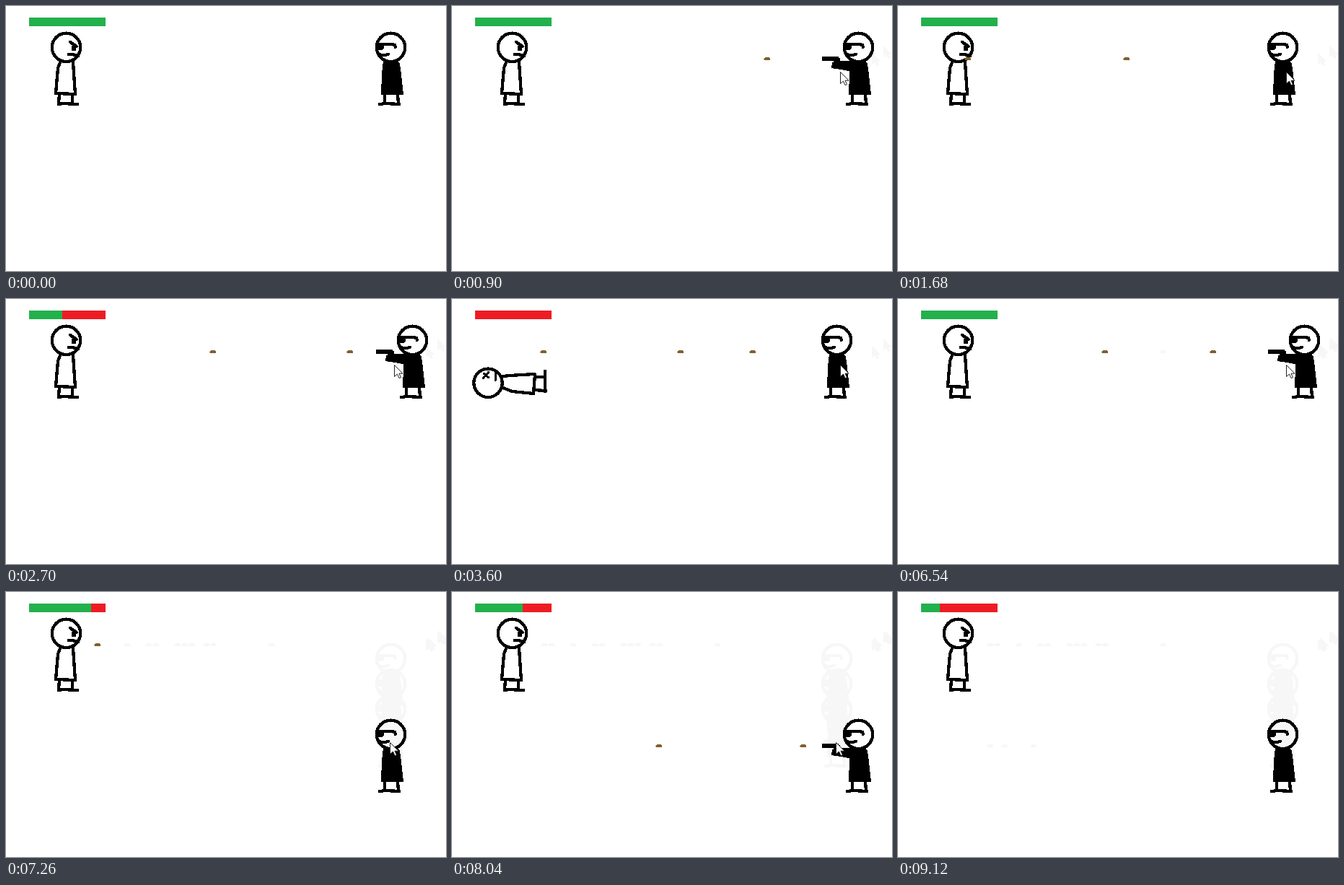
Animation of 610x367 px, one loop 9.36 s. Source, as an HTML page:

```html
<!DOCTYPE html>
<html lang="en">
<head>
<meta charset="utf-8">
<title>Duel</title>
<style>
  html, body { margin: 0; width: 100%; height: 100%; overflow: hidden; background: #fff; }
  svg { display: block; width: 610px; height: 367px; shape-rendering: crispEdges; }
  .ink { fill: none; stroke: #000; stroke-width: 4.3; stroke-linecap: round; stroke-linejoin: round; }
  .solid { fill: #000; }
  #trails .ink { stroke: #f7f7f7; }
  #trails .solid { fill: #f7f7f7; }
</style>
</head>
<body>
<svg viewBox="0 0 610 367">
  <g id="trails"></g>

  <rect x="32" y="16" width="106" height="12" fill="#ed1c24"/>
  <rect id="health" x="32" y="16" width="106" height="12" fill="#22b14c"/>

  <g id="alive">
    <g class="ink">
      <circle cx="83.5" cy="57.3" r="19.7"/>
      <path d="M89 50l9 6M87 67l5 0 8 2"/>
      <path d="M75 78l-3 8-3 35 27 1-3-44M74 122l-1 13M92 122v13M73 136l6-1 20 1"/>
    </g>
    <path class="solid" d="M91 55h6v7h-6z"/>
  </g>

  <g id="dead" class="ink">
    <circle cx="50" cy="116.3" r="19.7"/>
    <path stroke-width="3" d="M43 110l8-9M44 103l7 6M60 102l1 3-1 8"/>
    <path d="M71 107l9-1 34-2 1 1-2 26-30-3-12-5M115 108h14M113 126l17 1M129 100v28"/>
  </g>

  <g id="bullets"></g>

  <g id="shooter"></g>
  <path id="gun" class="solid" d="M513 70h23v2h2v4h14l4 2v13l-17-3-13-2 1-8h2v-2h-16z"/>
  <path id="cursor" d="M.5.5v16l4-3.5 2.6 5.7 2.4-1-2.5-5.5h5z" fill="#fff" stroke="#222" shape-rendering="auto"/>
</svg>

<script>
const LOOP = 9360, STEP = 60, TICK = 23;
const DEATH = 3600, REVIVE = 5400, GUN_TIME = 200;
const $ = id => document.getElementById(id);

const SHOOTER = `<g class="ink">
  <circle cx="533.5" cy="57.3" r="19.7"/>
  <path d="M515 53h20l4 1 1 3M516 66l4 2h5l5-1"/>
  <path d="M525 122v13M543 122l1 13M518 136l8-1 19 1"/></g>
  <path class="solid" d="M514 53h10v6l-3 2h-7zM523 76h20l3 4 2 15 3 28h-31l1-30z"/>`;
const BULLET = '<path d="M0 74v-1l3-2h5l1 2v2h-8z" class="solid"/>';
const ARROW = '<path d="M0 0v17l4-3 3 5 3-1-2-5h4z" class="solid"/>';

// Progress from 0 to 1 between two times
const ramp = (t, a, b) => Math.min(1, Math.max(0, (t - a) / (b - a)));
const drop = t => 140 * ramp(t, 6840, 7080);
const bulletX = dt => 512 - 10 * Math.round(dt / TICK);
const noise = n => { const v = Math.sin(n * 12.9898) * 43758.5453; return v - Math.floor(v); };

function mouseAt(t) {
  const away = (1 - ramp(t, 0, 480)) ** 2 + ramp(t, 4620, 4920)
    - ramp(t, 5460, 5760) + ramp(t, 8400, 8700);
  const down = ramp(t, 6900, 7200);
  return [Math.round(538 + 78 * away - 6 * down), Math.round(91 - 48 * away + 117 * down)];
}

function add(parent, inner) {
  const el = document.createElementNS('http://www.w3.org/2000/svg', 'g');
  el.innerHTML = inner;
  return $(parent).appendChild(el);
}
const show = (el, on) => { el.style.display = on ? '' : 'none'; };
const move = (el, x, y) => el.setAttribute('transform', `translate(${x} ${y})`);

$('shooter').innerHTML = SHOOTER;
$('bullets').style.cssText = '--shot: #806030';

// One shot per click
const clicks = [720, 1220, 1700, 2180, 2600, 2703, 3140, 3370, 3720, 4382, 6011, 6356, 7500, 7960];
const shots = clicks.map(t => {
  const dy = drop(t), el = add('bullets', BULLET);
  el.firstChild.style.fill = '#806030';
  return { t, dy, el, end: t + TICK * (dy ? 45.5 : 42.5) };
});

// Faint marks left behind by moving parts
const trails = [];
function trail(from, x, y, shape) {
  const el = add('trails', shape);
  move(el, x, y);
  trails.push({ el, from });
}
for (let t = 6900; t < 7080; t += STEP) trail(t + STEP, 0, drop(t), SHOOTER);
for (const t of [60, 120, 4800, 4860]) trail(t + STEP, ...mouseAt(t), ARROW);
for (let x = 123; x < 410; x += 10) {
  const passed = (532 - x) / 10 * TICK;
  if (noise(x) < 0.9 - x / 500) trail(x > 340 ? 4860 : 6356 + passed, x, 0, BULLET);
  if (noise(x + 1) < 0.1) trail(7960 + passed, x, 140, BULLET);
}

function draw(t) {
  const dead = t >= DEATH && t < REVIVE;
  let hits = 0, gun = false;
  for (const s of shots) {
    const sameRound = (s.t < REVIVE) === (t < REVIVE);
    const misses = s.end > DEATH && s.t < REVIVE;
    const x = bulletX(t - s.t);
    const hit = !misses && t >= s.end;
    if (sameRound && hit) hits++;
    if (t >= s.t && t < s.t + GUN_TIME) gun = true;
    show(s.el, sameRound && t >= s.t && !hit && x > -10);
    move(s.el, x, s.dy);
  }
  $('health').setAttribute('width', dead ? 0 : 106 - 20 * hits);
  show($('alive'), !dead);
  show($('dead'), dead);

  move($('shooter'), gun ? 30 : 0, drop(t));
  move($('gun'), 0, drop(t));
  show($('gun'), gun);
  move($('cursor'), ...mouseAt(t));
  for (const g of trails) show(g.el, t >= g.from);
}

const start = performance.now();
function loop() {
  const t = (performance.now() - start) % LOOP;
  draw(Math.floor(t / STEP) * STEP);
  requestAnimationFrame(loop);
}
loop();
</script>
</body>
</html>
```
